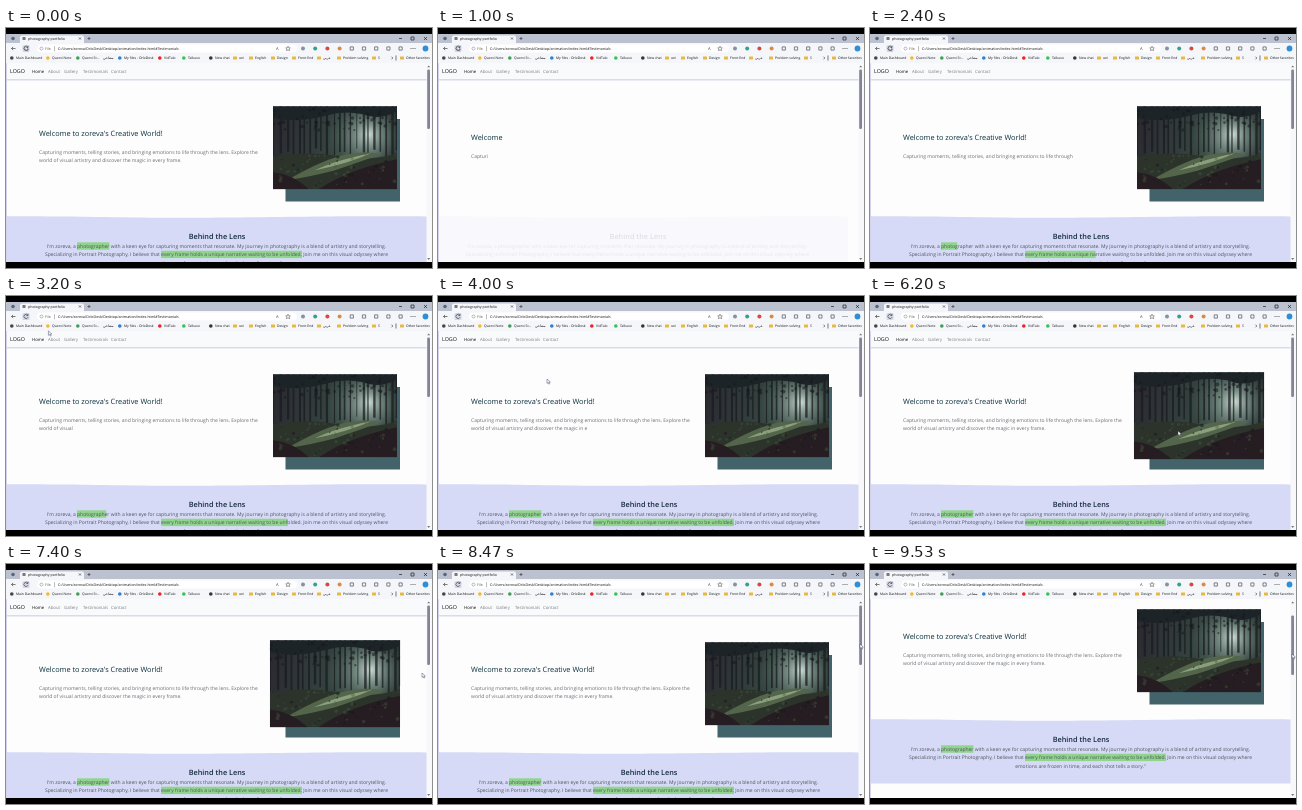
Write an HTML page with a canvas that moves like this. It is 426 px wide and 240 px high and loops after 9.59 s.

```html
<!DOCTYPE html>
<html lang="en">
<head>
<meta charset="utf-8">
<title>Portfolio page</title>
<style>
  html, body { margin: 0; width: 100%; height: 100%; overflow: hidden; background: #000; }
  canvas { display: block; }
</style>
</head>
<body>
<canvas id="stage" width="426" height="240"></canvas>
<script>
const ctx = document.getElementById('stage').getContext('2d');
const LOOP = 9590, RELOAD = 700, TYPE_START = 850, TYPE_STEP = 21.15;
const TITLE = "Welcome to zoreva's Creative World!";
const INTRO = [
  'Capturing moments, telling stories, and bringing emotions to life through the lens. Explore the ',
  'world of visual artistry and discover the magic in every frame.'
];
const ABOUT = [
  ["I'm zoreva, a ", 'photographer', ' with a keen eye for capturing moments that resonate. My journey in photography is a blend of artistry and storytelling.'],
  ['Specializing in Portrait Photography, I believe that ', 'every frame holds a unique narrative waiting to be unfolded.', ' Join me on this visual odyssey where'],
  ['emotions are frozen in time, and each shot tells a story."', '', '']
];
const BOOKMARKS = [
  [4, '#444', 'Main Dashboard'], [40, '#f4b928', 'Quorvi Note'], [70, '#3f9d58', 'Quorvi St...'],
  [112, '#2f7fd0', 'My files - OrloDesk'], [152, '#e22', 'VidTulo'], [176, '#36c25b', 'Talkuvo'],
  [203, '#333', 'New chat'], [227, 0, 'uni'], [243, 0, 'English'], [265, 0, 'Design'],
  [286, 0, 'Front End'], [311, 0, 'عربي'], [331, 0, 'Problem solving'], [366, 0, 'S'], [394, 0, 'Other favorites']
];
const TOOL_COLORS = ['#8690a0', '#2ca58d', '#d8483c', '#e0893a', '#4a4f5c', '#555', '#4a4f5c', '#555', '#4a4f5c'];
// time, x, y of the pointer
const POINTER = [[0, 19, 18], [2800, 19, 18], [4000, 109, 83], [5900, 308, 135], [6300, 308, 135],
  [7400, 416, 109], [8000, 422, 80], [8700, 422, 80], [9530, 422, 90], [LOOP, 422, 90]];

const ease = (t, from, to) => {
  const p = Math.min(1, Math.max(0, (t - from) / (to - from)));
  return p * p * (3 - 2 * p);
};

const noise = n => {
  const v = Math.sin(n * 127.1) * 43758.5;
  return v - Math.floor(v);
};

function rect(x, y, w, h, color) {
  ctx.fillStyle = color;
  ctx.fillRect(x, y, w, h);
}

function rounded(x, y, w, h, r, color) {
  ctx.fillStyle = color;
  ctx.beginPath();
  ctx.roundRect(x, y, w, h, r);
  ctx.fill();
}

function dot(x, y, r, color) {
  ctx.fillStyle = color;
  ctx.beginPath();
  ctx.arc(x, y, r, 0, 7);
  ctx.fill();
}

function shape(path, color) {
  ctx.fillStyle = color;
  ctx.fill(new Path2D(path));
}

function stroke(path, color = '#444', width = 0.7) {
  ctx.strokeStyle = color;
  ctx.lineWidth = width;
  ctx.stroke(new Path2D(path));
}

function setFont(size, weight = 400) {
  ctx.font = `${weight} ${size}px "Open Sans", sans-serif`;
}

function label(text, x, y, size, color, weight) {
  setFont(size, weight);
  ctx.fillStyle = color;
  ctx.fillText(text, x, y);
}

function drawBrowser() {
  rect(0, 6, 426, 9, '#bcc1cf');
  rounded(14, 7.5, 64, 9, 2, '#f5f6fa');
  rect(0, 15, 426, 20, '#f5f6fa');
  dot(7, 10.5, 1.8, '#5b6478');
  rect(16.5, 9, 3, 3, '#777');
  label('photography portfolio', 22, 12, 3.6, '#111');
  stroke('M73 9.5l2 2m0-2l-2 2M81.5 10.5h3M83 9v3');
  stroke('M393 10.5h3M405 9h3v3h-3zM418 9l3 3m0-3l-3 3', '#222');

  stroke('M9.5 20.5h-4l1.6-1.6M5.5 20.5l1.6 1.6');
  rounded(16.5, 17, 7, 7, 1.5, '#d3d6e4');
  stroke('M21.8 19.2a2.1 2.1 0 1 0 .2 2M22 17.9v1.6h-1.6');
  rounded(31, 16.5, 260, 8, 4, '#fff');
  stroke('M37 20.5a1.5 1.5 0 1 0-3 0a1.5 1.5 0 1 0 3 0M48.5 18.2v5', '#777', 0.5);
  label('File', 39, 21.9, 3.6, '#555');
  label('C:/Users/zoreva/OrloDesk/Desktop/animation/index.html#Testimonials', 52, 21.9, 3.65, '#111');
  label('A', 270, 22, 4, '#444');
  stroke('M282 18.2l.7 1.6 1.7.1-1.3 1.1.5 1.7-1.6-.9-1.5.9.4-1.7-1.2-1.1 1.7-.1z', '#444', 0.5);
  TOOL_COLORS.forEach((color, i) => {
    const x = 297 + i * 12.2;
    if (i < 4) dot(x, 20.5, 2, color);
    else stroke(`M${x - 1.6} 18.9h3.2v3.2h-3.2z`, color);
  });
  for (const x of [405, 407, 409]) dot(x, 20.5, 0.5, '#333');
  dot(419.5, 20.5, 2.9, '#2f8fd4');

  for (const [x, color, text] of BOOKMARKS) {
    if (color) dot(x + 1.8, 30, 1.8, color);
    else rounded(x, 28.4, 4, 3.2, 0.5, '#e8b93f');
    label(text, x + 6, 31.3, 3.4, '#111');
  }
  label('مفتاحي', 97, 31.3, 3.4, '#111');
  stroke('M385.5 28.7l1.3 1.3-1.3 1.3M390 27.5v5');
}

function drawNav() {
  rect(1, 35, 420, 17, '#f8fafb');
  rect(1, 51, 420, 1.5, '#dadbe8');
  label('LOGO', 4, 45, 5.35, '#111');
  [[26, 'Home'], [42, 'About'], [58, 'Gallery'], [77, 'Testimonials'], [105, 'Contact']]
    .forEach(([x, text], i) => label(text, x, 44.8, 4.3, i ? '#7c7e84' : '#111'));
}

function drawIntro(t) {
  let left = Math.max(0, Math.floor((t - TYPE_START) / TYPE_STEP));
  const y = left > INTRO[0].length ? 0 : 4.4;
  label(TITLE.slice(0, left), 33, 107.8 + y, 7.35, '#0c2f3a');
  INTRO.forEach((line, i) => {
    label(line.slice(0, left), 33, 125.6 + y + i * 8.3, 5, '#686c70');
    left = Math.max(0, left - line.length);
  });
}

function drawForest() {
  const base = ctx.createLinearGradient(0, 0, 124, 30);
  base.addColorStop(0, '#2a2730');
  base.addColorStop(0.5, '#34433f');
  base.addColorStop(1, '#27302f');
  rect(0, 0, 124, 83, base);
  const glow = ctx.createRadialGradient(96, 28, 1, 92, 32, 40);
  glow.addColorStop(0, '#c4d3cd');
  glow.addColorStop(0.3, 'rgba(135,158,148,.8)');
  glow.addColorStop(1, 'rgba(70,95,85,0)');
  rect(0, 0, 124, 83, glow);
  for (let i = 0; i < 22; i++) {
    rect(i * 5.8 + 3 * noise(i), 0, 0.8 + 1.8 * noise(i + 40), 42 + 14 * noise(i + 80), 'rgba(24,27,31,.75)');
  }
  shape('M0 50Q35 44 65 50T124 47V83H0z', '#2b332b');
  shape('M14 74Q45 56 66 50Q90 44 108 48Q80 58 62 64Q40 70 14 74z', '#53654a');
  shape('M42 64Q62 54 98 47Q76 57 42 64z', '#8c9f7d');
  shape('M46 83Q75 63 124 53V83zM0 66Q20 68 36 83H0z', '#261d22');
  shape('M0 0H124V5Q105 15 90 8Q70 4 55 9Q25 17 0 12z', '#1d2428');
  // loose foliage and undergrowth
  for (let i = 0; i < 130; i++) {
    const low = i % 2, x = 124 * noise(i + 200), y = low ? 46 + 34 * noise(i + 400) : 24 * noise(i + 400);
    dot(x, y, 0.6 + 1.3 * noise(i + 600), low && i % 3 ? 'rgba(74,92,66,.4)' : 'rgba(22,25,30,.55)');
  }
}

function drawPhoto(t, age) {
  const zoom = 1 + 0.05 * (ease(t, 5200, 5700) - ease(t, 7420, 7920));
  ctx.save();
  ctx.globalAlpha = ease(age, 1000, 1900);
  rect(279.5, 91, 114.5, 82.5, '#43636b');
  ctx.translate(329, 119.7);
  ctx.scale(zoom, zoom);
  ctx.translate(-62, -41.5);
  ctx.beginPath();
  ctx.rect(0, 0, 124, 83);
  ctx.clip();
  drawForest();
  ctx.restore();
}

function drawAbout(age) {
  const shown = ease(age, 800, 1750);
  const marked = Math.min(1, Math.max(0, (age - 1400) / 2000));
  ctx.save();
  ctx.globalAlpha = shown;
  ctx.translate(-12.5 * (1 - shown), 0);
  shape('M1 188.2C90 188.2 120 190 190 189.8S300 188 421 188.4V252.5H1z', '#d6daf6');
  ctx.textAlign = 'center';
  label('Behind the Lens', 211, 210.6, 7.3, '#132a3c', 600);
  ctx.textAlign = 'left';
  ABOUT.forEach(([before, mark, after], i) => {
    setFont(5);
    const line = before + mark + after, y = 219.9 + i * 8.4;
    const x = 210.5 - ctx.measureText(line).width / 2;
    const width = ctx.measureText(mark).width * marked;
    rect(x + ctx.measureText(before).width, y - 5.6, width, 7.4, '#90d58c');
    label(line, x, y, 5, '#50545e');
  });
  ctx.restore();
}

function drawScrollbar(scroll) {
  rect(420.5, 35, 5.5, 199, '#f8f8fb');
  shape('M421.2 39.3l1.5-1.9 1.5 1.9zM421.2 230l1.5 1.9 1.5-1.9z', '#777');
  rounded(421.2, 41.5 + scroll * 0.3, 2.8, 59.5, 1.2, '#83839a');
}

function drawPointer(t) {
  const next = POINTER.findIndex(p => p[0] > t);
  const [t0, x0, y0] = POINTER[next - 1], [t1, x1, y1] = POINTER[next];
  const p = ease(t, t0, t1);
  ctx.save();
  ctx.translate(x0 + (x1 - x0) * p, y0 + (y1 - y0) * p);
  const arrow = 'M0 0v4.4l1.1-1 .8 1.8.8-.4-.8-1.7h1.5z';
  shape(arrow, '#fff');
  stroke(arrow, '#39405c', 0.45);
  ctx.restore();
}

function draw(t) {
  const age = t < RELOAD ? LOOP : t;
  const scroll = 33 * ease(t, 8700, 9530);
  ctx.textRendering = 'geometricPrecision';
  rect(0, 0, 426, 240, '#000');
  rect(0, 6, 426, 228, '#d3d3ee');
  ctx.save();
  ctx.beginPath();
  ctx.rect(1, 35, 420, 199);
  ctx.clip();
  rect(1, 35, 420, 199, '#fdfdfe');
  ctx.translate(0, -scroll);
  drawNav();
  drawIntro(age);
  drawPhoto(t, age);
  drawAbout(age);
  ctx.restore();
  drawBrowser();
  drawScrollbar(scroll);
  drawPointer(t);
  rect(0, 234, 426, 6, '#000');
}

const start = performance.now();
function tick() {
  draw((performance.now() - start) % LOOP);
  requestAnimationFrame(tick);
}
tick();
</script>
</body>
</html>
```
